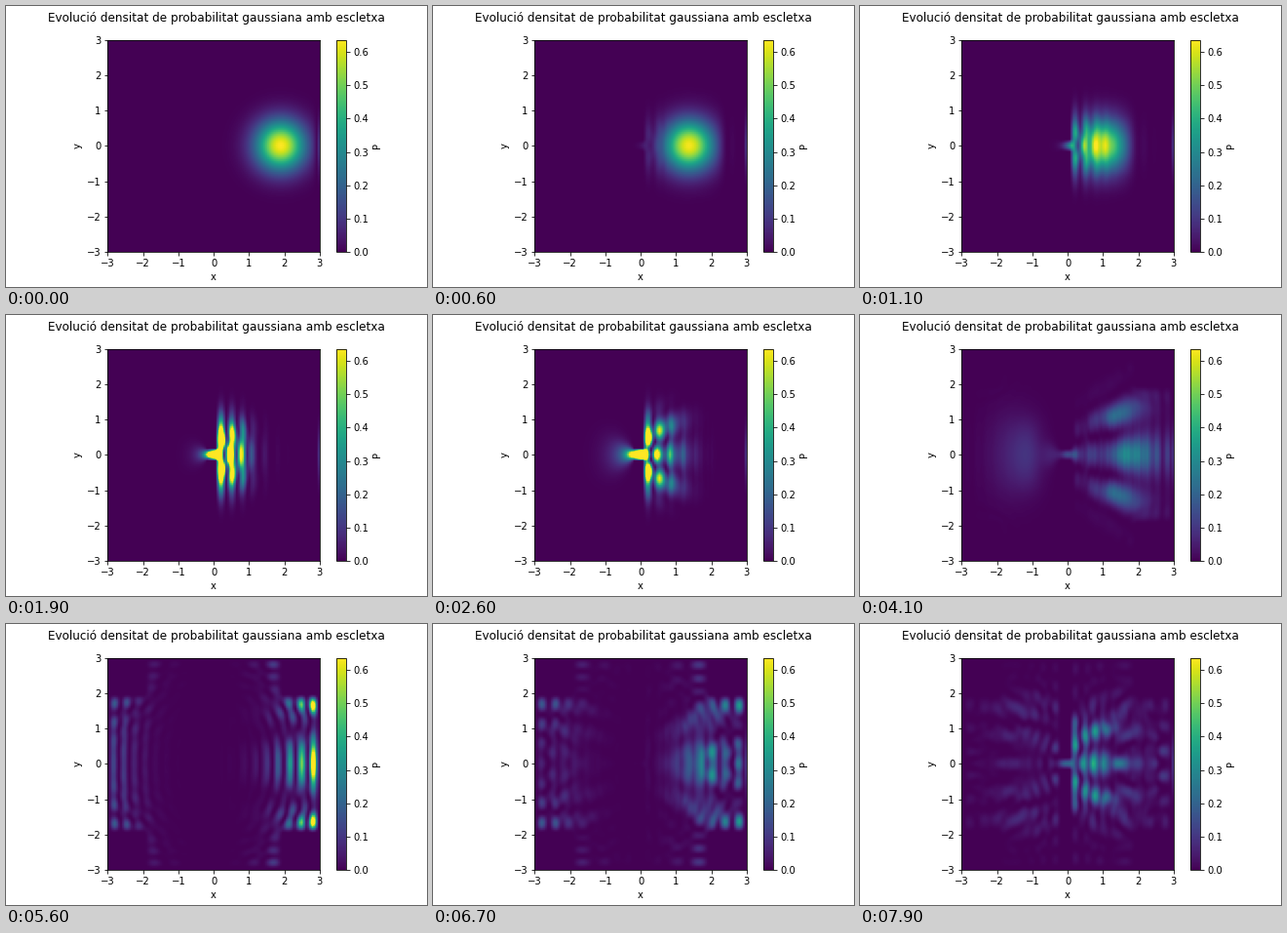
Animation, 432 px wide and 288 px high, one loop 8 s. Source, as a matplotlib script:

```python
import numpy as np
import matplotlib.pyplot as plt
from matplotlib.animation import FuncAnimation

# Gaussian wave packet hitting a slit in a closed box, solved with an ADI
# Crank-Nicolson scheme (hbar = m = 1).
L, N = 3.0, 101
DT, FRAMES, INTERVAL = 0.01, 80, 100
X0, K0 = 2.0, -10.0

grid = np.linspace(-L, L, N)
dx = grid[1] - grid[0]
X, Y = np.meshgrid(grid, grid)


def open_cells():
    """True where the particle can move: no slit wall, no corner blocks."""
    wall = (X > -0.2) & (X < 0.1) & (np.abs(Y) > 0.15)
    corner = (np.abs(X) > 1.95) & (np.abs(Y) > 1.95)
    return ~(wall | corner)


def line_operators(free):
    """Explicit and implicit half-step matrices for each line of cells."""
    n = free.shape[1]
    kin = (2 * np.eye(n) - np.eye(n, k=1) - np.eye(n, k=-1)) / (2 * dx**2)
    ham = kin * (free[:, :, None] & free[:, None, :])
    half = 0.5j * DT * ham
    return np.eye(n) - half, np.linalg.inv(np.eye(n) + half)


def apply(op, psi):
    return np.matmul(op, psi[..., None])[..., 0]


def evolve():
    psi0 = np.sqrt(2 / np.pi) * np.exp(-(X - X0)**2 - Y**2 + 1j * K0 * X)
    free = open_cells()[1:-1, 1:-1]
    exp_x, imp_x = line_operators(free)
    exp_y, imp_y = line_operators(free.T)
    psi = psi0[1:-1, 1:-1] * free
    density = np.abs(psi0)**2
    result = []
    for _ in range(FRAMES):
        psi = apply(imp_x, apply(exp_y, psi.T).T)
        psi = apply(imp_y, apply(exp_x, psi).T).T
        density[1:-1, 1:-1] = np.abs(psi)**2
        result.append(density.copy())
    return result


densities = evolve()

plt.rcParams["font.family"] = "DejaVu Sans"
fig, ax = plt.subplots(figsize=(6, 4), dpi=72, facecolor="white")
fig.subplots_adjust(left=0.125, right=0.9, bottom=0.125, top=0.88)
fig.suptitle("Evolució densitat de probabilitat gaussiana amb escletxa")

image = ax.imshow(densities[0], origin="lower", extent=(-L, L, -L, L),
                  cmap="viridis", vmin=0, vmax=2 / np.pi)
ax.set_xlabel("x")
ax.set_ylabel("y")
ax.set_xticks(range(-3, 4))
ax.set_yticks(range(-3, 4))
fig.colorbar(image, ax=ax, label="P")


def update(i):
    image.set_data(densities[i])
    return [image]


anim = FuncAnimation(fig, update, frames=FRAMES, interval=INTERVAL,
                     repeat=True, repeat_delay=0)
plt.show()
```
